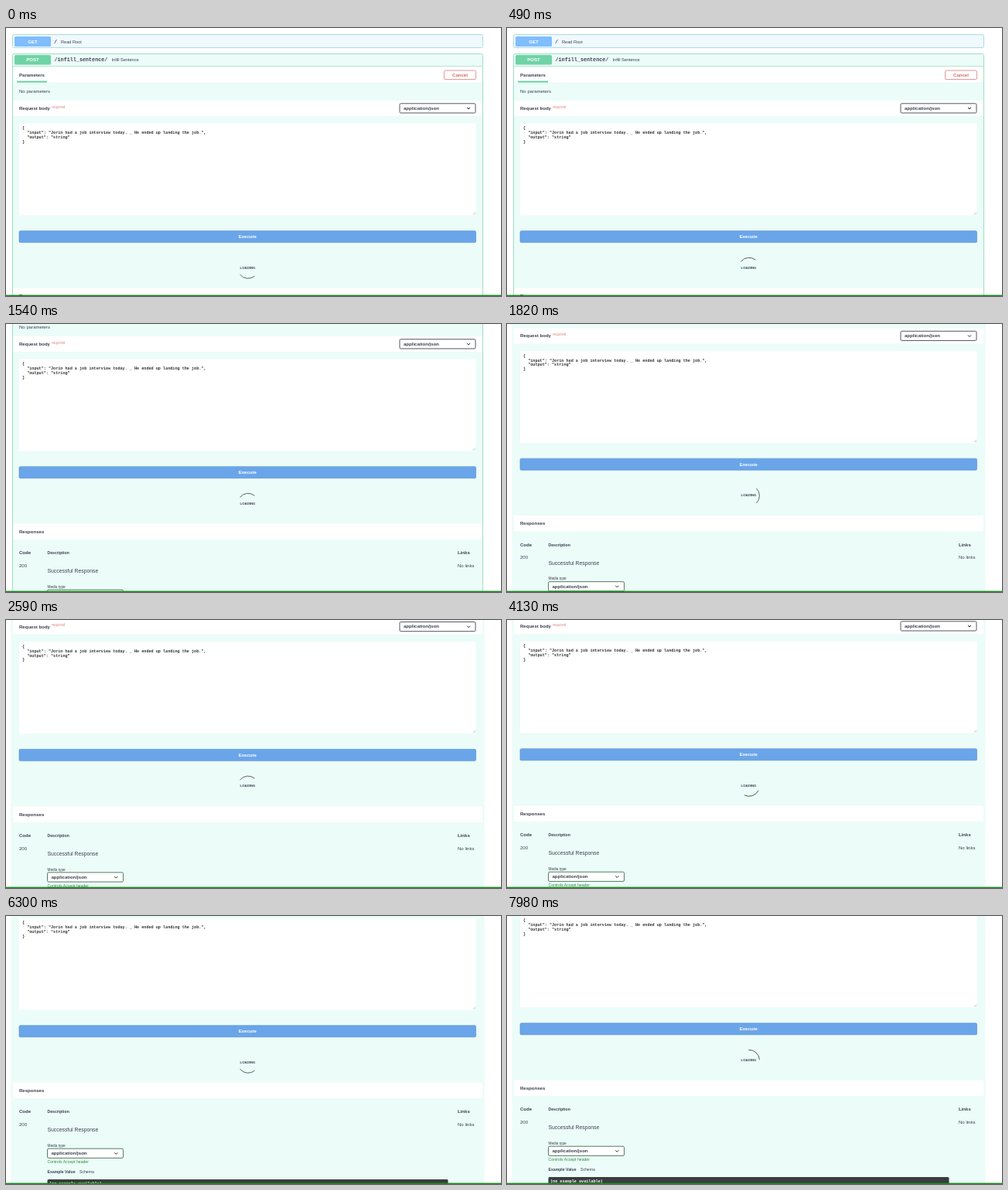
An HTML page for the animation above (8 s loop, 640 by 347 pixels).

```html
<!DOCTYPE html>
<html lang="en">
<head>
<meta charset="utf-8">
<title>API docs</title>
<style>
  html, body { margin: 0; width: 100%; height: 100%; overflow: hidden; background: #fff; }
  svg { display: block; width: 100%; height: 100%; }
  text {
    font: 6.05px "Liberation Sans", Arial, sans-serif;
    fill: #3b4151; dominant-baseline: central; white-space: pre;
  }
  .b { font-weight: 700; }
  .mid { text-anchor: middle; }
  .small { font-size: 5.15px; }
  .tiny { font-size: 4.75px; }
  .path { font: 700 6.75px "Liberation Mono", monospace; }
  .code { font: 700 5.15px "Liberation Mono", monospace; fill: #333; }
  .white { fill: #fff; }
  .card { fill: #ecfcf8; stroke: #86d9b7; stroke-width: .8; }
  .settled .card { stroke: #ecfcf8; stroke-width: 4; }
  .select { fill: #fff; stroke: #41444e; stroke-width: .9; }
  .chevron { fill: none; stroke: #222; stroke-width: 1; }
  #arc { fill: none; stroke: #555; stroke-width: .9; }
</style>
</head>
<body>
<svg viewBox="0 0 640 347" preserveAspectRatio="none">
  <g id="page">
    <!-- GET row -->
    <rect x="8.5" y="8.5" width="608" height="17" rx="2" fill="#f0f9fd" stroke="#9bd3dc" stroke-width=".8"/>
    <rect x="11" y="11" width="47" height="13" rx="1.5" fill="#7fbdfd"/>
    <text class="b mid white" x="34.5" y="17.5">GET</text>
    <text class="path" x="62" y="17.5">/</text>
    <text x="71" y="17.5" style="font-size:5.6px">Read Root</text>

    <!-- POST block -->
    <rect class="card" x="8.5" y="33.5" width="608" height="560" rx="2"/>
    <rect x="11" y="35" width="47" height="12.5" rx="1.5" fill="#6fd3a6"/>
    <text class="b mid white" x="34.5" y="41.3">POST</text>
    <text class="path" x="62.5" y="41.3">/infill_sentence/</text>
    <text x="136.5" y="41.3" style="font-size:5.6px">Infill Sentence</text>
    <path d="M9 49.5H616" stroke="#a5e2cb" stroke-width=".8"/>

    <rect class="white" x="9" y="50" width="607" height="20.5"/>
    <text class="b" x="17" y="60.7">Parameters</text>
    <rect x="14" y="68.6" width="39" height="1.9" fill="#5fcf9d"/>
    <rect x="566.5" y="55" width="41" height="11.5" rx="1.5" fill="#fff" stroke="#e08c8c" stroke-width=".9"/>
    <text class="b mid" x="587" y="60.7" style="fill:#cf6a6a">Cancel</text>
    <text x="17" y="81.7">No parameters</text>

    <rect class="white" x="9" y="94" width="607" height="20"/>
    <text class="b" x="17" y="104">Request body</text>
    <text class="tiny" x="59" y="102.3" style="fill:#e08a8a">required</text>
    <rect class="select" x="509" y="97.8" width="98" height="12.2" rx="1.5"/>
    <text class="b" x="514" y="103.8">application/json</text>
    <path class="chevron" d="M596 103l2 2 2-2"/>

    <rect class="white" x="17" y="123.5" width="590.5" height="119" rx="1.5"/>
    <g id="json"></g>
    <path d="M604 241.5l3-3M606 241.5l1-1" stroke="#888" stroke-width=".5"/>

    <rect x="17" y="262.7" width="590.5" height="15" rx="1.5" fill="#6aa5e9" stroke="#5c96da" stroke-width=".7"/>
    <text class="b mid white" x="312.3" y="270.2">Execute</text>

    <text class="b mid" x="312.5" y="310.3" style="font-size:4.3px">LOADING</text>
    <path id="arc" d="M-9.5 -9.5A13.4 13.4 0 0 1 9.5 -9.5"/>

    <!-- Responses -->
    <rect class="white" x="9" y="336.6" width="607" height="20.4"/>
    <text class="b" x="17" y="346.9">Responses</text>
    <text class="b" x="17" y="374.3">Code</text>
    <text class="b small" x="53.5" y="374.3">Description</text>
    <text class="b" x="584" y="374.3">Links</text>
    <text x="17" y="391">200</text>
    <text x="584" y="391" font-style="italic">No links</text>
    <text x="53.5" y="397.7" style="font-size:6.85px">Successful Response</text>
    <text class="tiny" x="53.5" y="418.5">Media type</text>
    <rect class="select" x="53.5" y="422.2" width="98" height="12.2" rx="1.5" style="stroke:#41704e"/>
    <text class="b" x="58.5" y="428.2">application/json</text>
    <path class="chevron" d="M140.3 427.4l2 2 2-2"/>
    <text class="small" x="53.5" y="438.9" style="fill:#2f8a42">Controls Accept header</text>
    <text class="b small" x="53.5" y="452.3">Example Value</text>
    <text class="small" x="95" y="452.3">Schema</text>
    <rect x="53.5" y="462" width="518" height="15" rx="1.5" fill="#3a3d3e"/>
    <text class="code white" x="56" y="468.3" style="fill:#fff">(no example available)</text>
  </g>
  <rect y="345.6" width="640" height="1.4" fill="#1b8c22"/>
</svg>
<script>
  const LOOP = 8000, STEP = 70, DEGREES_PER_STEP = 24;
  const page = document.getElementById('page');
  const arc = document.getElementById('arc');

  const body = [
    '{',
    '  "input": "Jorin had a job interview today. _ He ended up landing the job.",',
    '  "output": "string"',
    '}'
  ];
  document.getElementById('json').innerHTML = body.map((line, i) =>
    `<text class="code" x="21" y="${130.4 + i * 5.8}">${line}</text>`).join('');

  const coast = (from, to, elapsed, tau) => to + (from - to) * Math.exp(-elapsed / tau);

  // Two flicks of the scroll wheel, each coasting to rest.
  function scrollAt(t) {
    if (t < 800) return 0;
    if (t < 1260) return 53 * ((t - 800) / 460) ** 1.17;
    if (t < 5840) return coast(53, 96, t - 1260, 320);
    if (t < 6020) return 96 + 1.4 * (t - 5840) / 180;
    if (t < 6300) {
      const p = (t - 6020) / 280;
      return 97.4 + 23.6 * p * p * (3 - 2 * p);
    }
    return coast(121, 124, t - 6300, 140);
  }

  function draw(now) {
    const step = Math.floor((now % LOOP) / STEP);
    const t = step * STEP;
    page.setAttribute('transform', `translate(0 ${-scrollAt(t).toFixed(2)})`);
    page.classList.toggle('settled', t >= 1750);
    arc.setAttribute('transform', `translate(313 310.8) rotate(${186 + step * DEGREES_PER_STEP})`);
  }

  const start = performance.now();
  function tick() {
    draw(performance.now() - start);
    requestAnimationFrame(tick);
  }
  tick();
</script>
</body>
</html>
```
